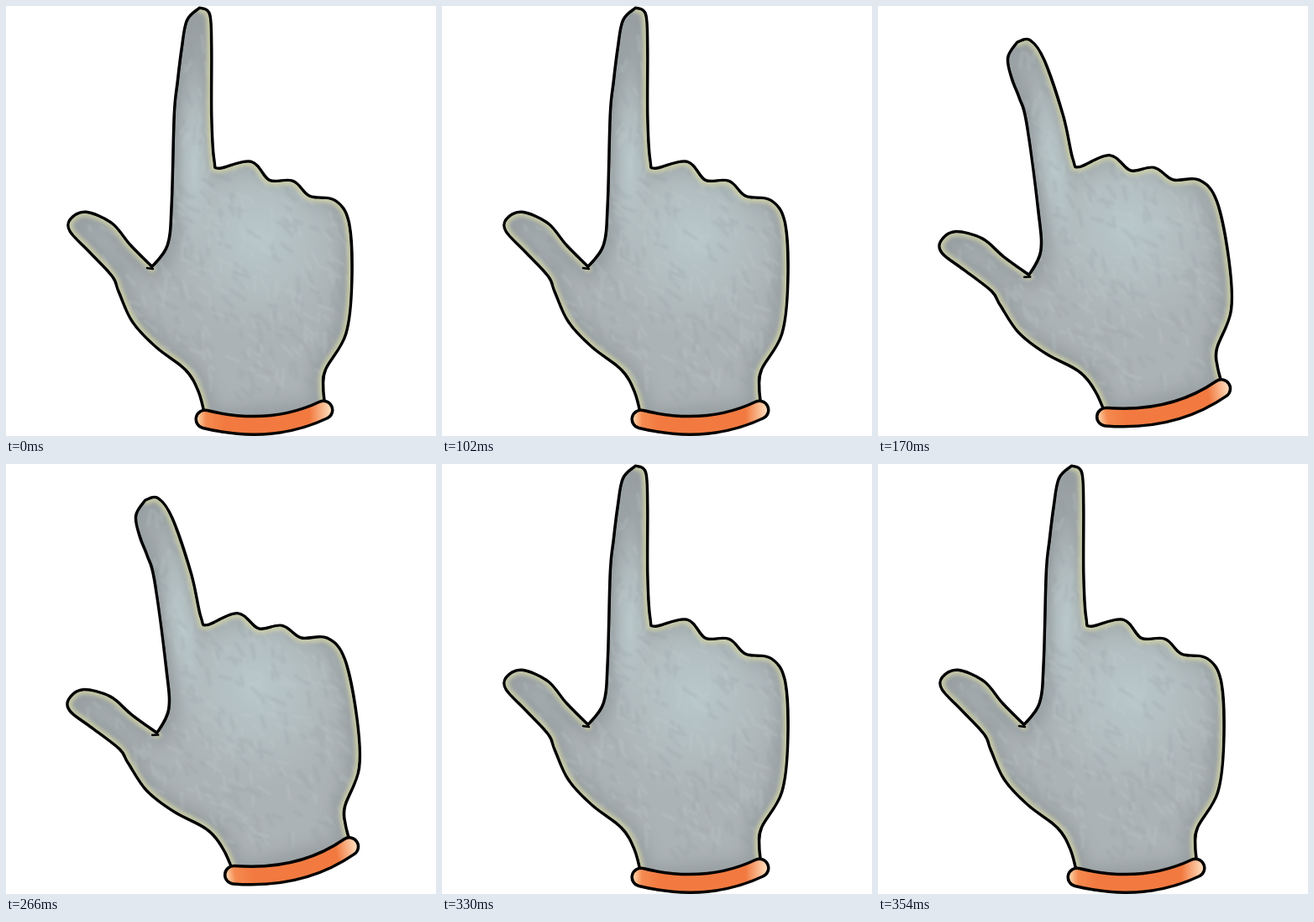
An HTML page for the animation above (0.37 s loop, 512 by 512 pixels).

```html
<!DOCTYPE html>
<html lang="en">
<head>
<meta charset="utf-8">
<title>Pointing glove</title>
<style>
  html, body { margin: 0; width: 100%; height: 100%; overflow: hidden; background: #fff; }
  svg { display: block; width: 100%; height: 100%; }
</style>
</head>
<body>
<svg id="stage" viewBox="0 0 512 512" fill="none" stroke-linecap="round" stroke-linejoin="round">
  <defs>
    <filter id="soft" filterUnits="userSpaceOnUse" x="0" y="0" width="512" height="540"><feGaussianBlur stdDeviation="2"/></filter>
    <filter id="shade" filterUnits="userSpaceOnUse" x="0" y="0" width="512" height="540"><feGaussianBlur stdDeviation="10"/></filter>
    <filter id="paint" filterUnits="userSpaceOnUse" x="0" y="0" width="512" height="540"><feGaussianBlur stdDeviation="1"/></filter>
    <radialGradient id="light">
      <stop stop-color="#b9c8ca"/>
      <stop offset=".5" stop-color="#b5c2c4" stop-opacity=".7"/>
      <stop offset="1" stop-color="#b2bcbf" stop-opacity="0"/>
    </radialGradient>
    <linearGradient id="band" gradientUnits="userSpaceOnUse" x1="227" x2="389" y1="0" y2="0">
      <stop stop-color="#ffd9b0"/>
      <stop offset=".07" stop-color="#f58a50"/>
      <stop offset=".2" stop-color="#f27a40"/>
      <stop offset=".83" stop-color="#f27a40"/>
      <stop offset="1" stop-color="#ffe6c8"/>
    </linearGradient>
  </defs>
</svg>
<script>
const LOOP = 370, BENT_FROM = 170, BENT_TO = 330;
const BENT_POSE = 'translate(-42 42) rotate(-9.3)';
const JOINT = { x: 226, y: 110, angle: -20, length: .72, width: 1.28, ease: 40 };

// Key points of the outline, split at the web and at the fingertip.
const thumb = [[240, 494], [231, 459], [215, 432], [180, 405], [152, 375], [136, 340], [128, 321],
  [100, 291], [78, 268], [78, 255], [95, 247], [125, 260], [147, 286], [174, 313]];
const finger = [[174, 313], [194, 285], [199, 235], [202, 130], [206, 90], [211, 50], [217, 18], [231, 4]];
const knuckles = [[231, 4], [241, 11], [243, 50], [243, 130], [246, 183], [253, 195], [291, 187], [313, 209],
  [341, 210], [361, 228], [391, 233], [407, 260], [410, 330], [403, 390], [379, 432], [376, 455], [379, 482]];
const CUFF = 'M237 492Q315 511 378 481';

const stage = document.getElementById('stage');

function add(parent, tag, attrs) {
  const node = document.createElementNS('http://www.w3.org/2000/svg', tag);
  for (const key in attrs) node.setAttribute(key, attrs[key]);
  return parent.appendChild(node);
}

// Turns and shortens the part of the finger above the joint.
function bend([x, y]) {
  const rise = JOINT.y - y;
  if (rise <= 0) return [x, y];
  const a = JOINT.angle * Math.min(1, rise / JOINT.ease) * Math.PI / 180;
  const u = (x - JOINT.x) * JOINT.width, v = -rise * JOINT.length;
  return [JOINT.x + u * Math.cos(a) - v * Math.sin(a), JOINT.y + u * Math.sin(a) + v * Math.cos(a)];
}

// Smooth curve through the points, without the initial move.
function curve(pts) {
  const at = i => pts[Math.max(0, Math.min(pts.length - 1, i))];
  return pts.slice(1).map((end, i) => {
    const begin = pts[i];
    const c1 = begin.map((v, k) => v + (end[k] - at(i - 1)[k]) / 6);
    const c2 = end.map((v, k) => v - (at(i + 2)[k] - begin[k]) / 6);
    return `C${c1} ${c2} ${end}`;
  }).join('');
}

function random(seed) {
  return () => (seed = seed * 16807 % 2147483647) / 2147483647;
}

function brushwork(parent, seed) {
  const rnd = random(seed);
  const dabs = ['', ''];
  for (let i = 0; i < 700; i++) {
    const x = 90 + rnd() * 320, y = 20 + rnd() * 440;
    const angle = (y < 200 ? 1.5 : 1) + (rnd() - .5) * 1.4;
    const length = 5 + rnd() * 14;
    dabs[i % 2] += `M${x} ${y}l${Math.cos(angle) * length} ${Math.sin(angle) * length}`;
  }
  dabs.forEach((d, i) => add(parent, 'path', {
    d, stroke: i ? '#c6d0d2' : '#929b9f', 'stroke-width': 4, opacity: .2, filter: 'url(#paint)'
  }));
}

function drawHand(id, seed, shape, transform) {
  const group = add(stage, 'g', { transform });
  const runs = [thumb, finger, knuckles].map(run => run.map(shape));
  const d = `M${runs[0][0]}${runs.map(curve).join('')}Z`;
  add(add(group, 'clipPath', { id }), 'path', { d });

  add(group, 'path', { d, stroke: '#000', 'stroke-width': 7 });
  const skin = add(group, 'g', { 'clip-path': `url(#${id})` });
  add(skin, 'path', { d, fill: '#acb3b6' });
  add(skin, 'path', { d, stroke: '#838b8e', 'stroke-width': 24, opacity: .55, filter: 'url(#shade)' });
  add(skin, 'ellipse', { cx: 300, cy: 275, rx: 115, ry: 125, fill: 'url(#light)' });
  add(skin, 'ellipse', { cx: 224, cy: 190, rx: 24, ry: 130, fill: 'url(#light)' });
  brushwork(skin, seed);
  for (const run of [runs[0], runs[2]]) {
    add(skin, 'path', {
      d: `M${run[0]}${curve(run)}`, stroke: '#d3d4a6', 'stroke-width': 8, opacity: .75, filter: 'url(#soft)'
    });
  }
  add(group, 'path', { d: 'M168 312L175 313', stroke: '#000', 'stroke-width': 2.5 });

  add(group, 'path', { d: CUFF, stroke: '#000', 'stroke-width': 25 });
  add(group, 'path', { d: CUFF, stroke: 'url(#band)', 'stroke-width': 18 });
  return group;
}

const straightHand = drawHand('straight', 7919, p => p, '');
const bentHand = drawHand('bent', 104729, bend, BENT_POSE);

function render(ms) {
  const t = ms % LOOP;
  const isBent = t >= BENT_FROM && t < BENT_TO;
  straightHand.style.display = isBent ? 'none' : '';
  bentHand.style.display = isBent ? '' : 'none';
}

const begin = performance.now();
function tick() {
  render(performance.now() - begin);
  requestAnimationFrame(tick);
}
tick();
</script>
</body>
</html>
```
